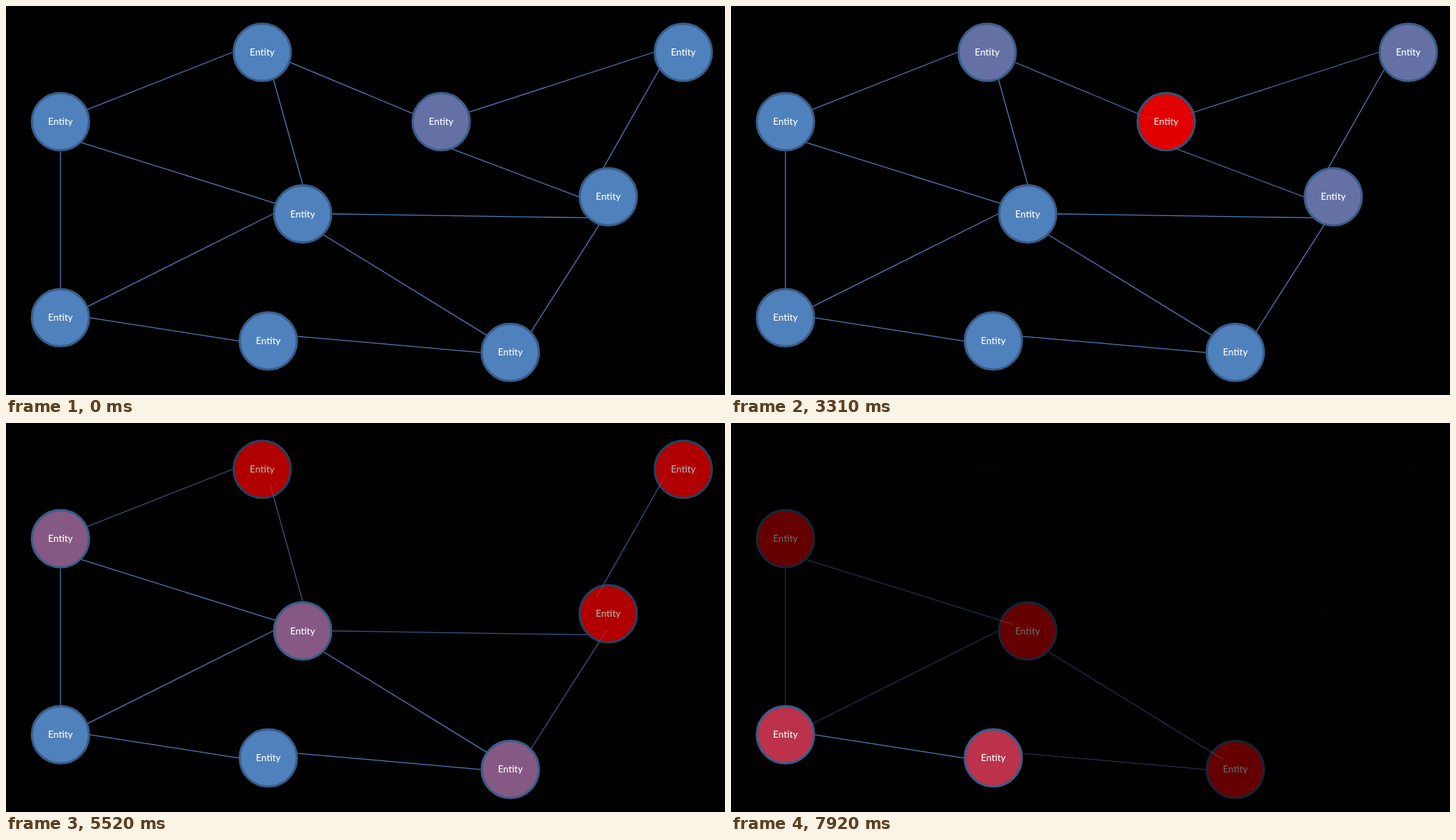
Write an HTML page that moves like this. It is 1017 by 550 pixels and loops after 8000 ms.

```html
<!DOCTYPE html>
<html lang="en">
<head>
<meta charset="utf-8">
<title>Spreading through a network</title>
<style>
  html, body { margin: 0; width: 100%; height: 100%; overflow: hidden; background: #000; }
  svg { display: block; }
  line { stroke: #4a7ebb; stroke-width: 1.3; }
  circle { stroke: #385d8a; stroke-width: 3.2; }
  text { fill: #fff; font: 500 13.4px Lato, Carlito, "Open Sans", sans-serif; text-anchor: middle; }
</style>
</head>
<body>
<svg id="stage" width="1017" height="550" viewBox="0 0 1017 550"></svg>
<script>
const LOOP = 8000, HOLD = 1500, TICK = 200.6, WAVE = 10;
const RADIUS = 42, RING = 3.2, DIP = 20;
const BLUE = [79, 129, 189], RED = [255, 0, 0];
const stage = document.getElementById('stage');

// Centres; the first node is where the spread begins
const nodes = [
  [615.5, 163.6], [362.4, 65.5], [958, 65.5], [851.9, 269.7], [77, 163.5],
  [419.6, 294], [713.3, 489.8], [77, 440.8], [371, 473.6]
].map(([x, y]) => ({ x, y, wave: Infinity }));

// Node and rim position at both ends, in eighths of a turn clockwise from the right
const links = [
  [1, 0.44, 0, 4.36], [2, 4, 0, 7.58], [3, 4, 0, 1.5],
  [1, 4, 4, 7.46], [5, 6, 1, 1.5], [2, 3.21, 3, 5.8],
  [5, 0, 3, 3], [6, 7, 3, 2.4],
  [4, 1, 5, 4.47], [4, 2, 7, 6], [5, 4, 7, 7.5],
  [5, 1, 6, 4.8], [6, 4, 8, 7.8], [7, 0, 8, 4]
].map(([a, atA, b, atB]) => ({ a: nodes[a], atA, b: nodes[b], atB }));

// A node's wave is its number of hops from the first node
function spread(node, hops) {
  if (hops >= node.wave) return;
  node.wave = hops;
  for (const { a, b } of links) {
    if (a === node) spread(b, hops + 1);
    if (b === node) spread(a, hops + 1);
  }
}
spread(nodes[0], 0);

function add(parent, tag, attrs) {
  const el = document.createElementNS('http://www.w3.org/2000/svg', tag);
  for (const key in attrs) el.setAttribute(key, attrs[key]);
  return parent.appendChild(el);
}

function rim(node, eighths) {
  const angle = eighths * Math.PI / 4;
  return [node.x + RADIUS * Math.cos(angle), node.y + RADIUS * Math.sin(angle)];
}

// Ends between the eight main rim points run on a little under the disc
for (const link of links) {
  const [x1, y1] = rim(link.a, link.atA), [x2, y2] = rim(link.b, link.atB);
  const scale = DIP / Math.hypot(x2 - x1, y2 - y1);
  const over1 = link.atA % 1 ? scale : 0, over2 = link.atB % 1 ? scale : 0;
  link.wave = Math.min(link.a.wave, link.b.wave);
  link.view = add(stage, 'line', {
    x1: x1 - (x2 - x1) * over1, y1: y1 - (y2 - y1) * over1,
    x2: x2 + (x2 - x1) * over2, y2: y2 + (y2 - y1) * over2
  });
}

for (const node of nodes) {
  node.view = add(stage, 'g', {});
  node.disc = add(node.view, 'circle', { cx: node.x, cy: node.y, r: RADIUS - RING / 2 });
  add(node.view, 'text', { x: node.x, y: node.y + 4.5 }).textContent = 'Entity';
}

// Quadratic ease-out over one wave
function progress(step, wave) {
  const s = (step - wave * WAVE - 0.38) / (WAVE - 0.38);
  return 1 - (1 - Math.min(1, Math.max(0, s))) ** 2;
}

const mix = p => `rgb(${BLUE.map((b, i) => Math.round(b + (RED[i] - b) * p))})`;

// Each node turns red in its own wave and fades in the next
function draw(t) {
  const step = t < HOLD ? 1 : 2 + Math.floor((t - HOLD) / TICK);
  for (const { wave, view } of [...links, ...nodes]) {
    view.setAttribute('opacity', 1 - 0.99 * progress(step, wave + 1));
  }
  for (const { wave, disc } of nodes) {
    disc.setAttribute('fill', mix(progress(step, wave)));
  }
}

const start = performance.now();
function frame() {
  draw((performance.now() - start) % LOOP);
  requestAnimationFrame(frame);
}
draw(0);
requestAnimationFrame(frame);
</script>
</body>
</html>
```
